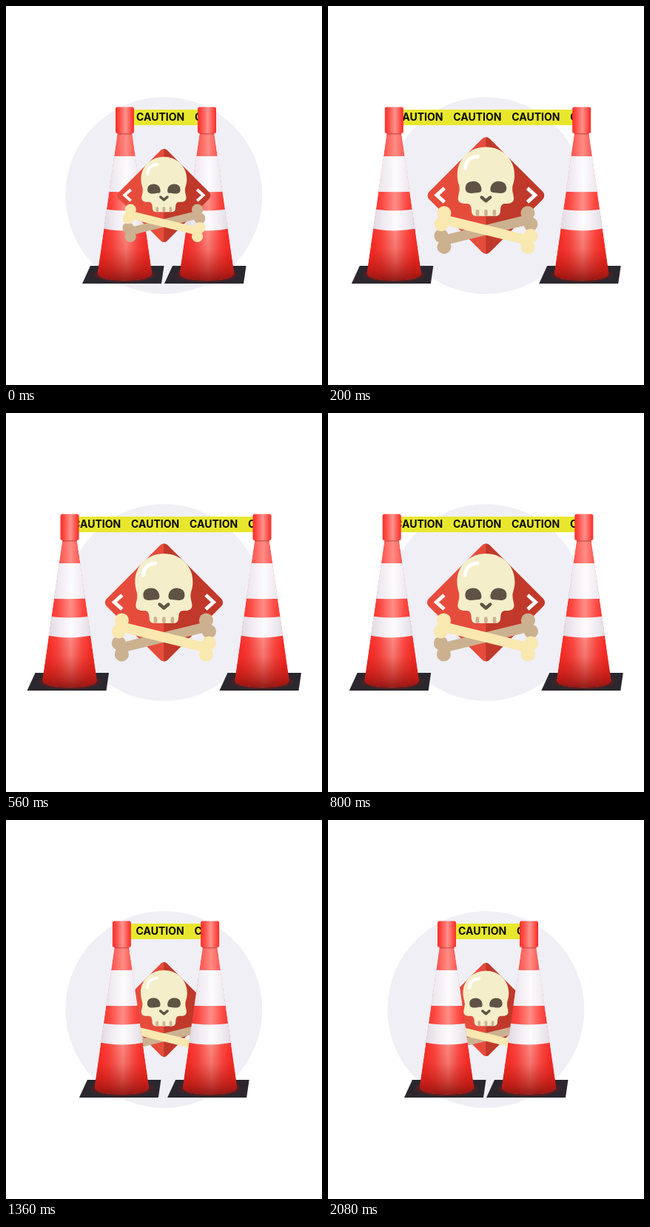
Animation, 427 px wide and 512 px high, one loop 2.12 s. Source, as an HTML page with a canvas:

```html
<!DOCTYPE html>
<html lang="en">
<head>
<meta charset="utf-8">
<title>Caution</title>
<style>
html, body { margin: 0; width: 100%; height: 100%; overflow: hidden; background: #fff; }
canvas { display: block; }
</style>
</head>
<body>
<canvas id="stage" width="427" height="512"></canvas>
<script>
const ctx = document.getElementById('stage').getContext('2d');
const LOOP = 2120, STEP = 40, CLOSE_AT = 1157;
const TRAVEL = 74.3;
const LEFT = 160.5, RIGHT = 271.5;

// Underdamped spring from 0 to 1, t in ms
function spring(t) {
  const s = Math.max(0, t) / 1000, w = 26.2 * s;
  return 1 - Math.exp(-8.43 * s) * (Math.cos(w) + 0.3216 * Math.sin(w));
}

function ramp(gradient, ...stops) {
  stops.forEach(([at, color]) => gradient.addColorStop(at, color));
  return gradient;
}

function fill(path, color) {
  ctx.fillStyle = color;
  ctx.fill(path);
}

function stroke(path, color, width, cap = 'round') {
  ctx.strokeStyle = color;
  ctx.lineWidth = width;
  ctx.lineCap = cap;
  ctx.lineJoin = cap === 'round' ? 'round' : 'miter';
  ctx.stroke(new Path2D(path));
}

function circle(x, y, r, color) {
  const p = new Path2D();
  p.arc(x, y, r, 0, Math.PI * 2);
  fill(p, color);
}

function mirrored(draw) {
  for (const side of [1, -1]) {
    ctx.save();
    ctx.scale(side, 1);
    draw();
    ctx.restore();
  }
}

const baseShape = new Path2D('M-46.5 351H53L49.5 375H-57.5Z');
const coneShape = new Path2D('M-9.6 170H9.6L36.8 361Q36 370.5 0 370.5Q-36 370.5-36.8 361Z');
const bands = [
  new Path2D('M-40 202Q0 204 40 202V249.5Q0 253 -40 249.5Z'),
  new Path2D('M-40 272Q0 281 40 272V298Q0 309 -40 298Z')
];
const capShape = new Path2D();
capShape.roundRect(-12.5, 136.5, 25, 35.5, 2.5);

const redAcross = ramp(ctx.createLinearGradient(-12.5, 0, 12.5, 0),
  [0, '#fb2f29'], [0.18, '#ff4741'], [0.55, '#ff928d'], [0.82, '#ff514b'], [1, '#f92d27']);
const whiteAcross = ramp(ctx.createLinearGradient(-27, 0, 27, 0),
  [0, '#e2dbe3'], [0.25, '#f1ebf2'], [0.55, '#fdfbfd'], [0.8, '#f1ecf2'], [1, '#e4dde5']);
const bodyRed = ramp(ctx.createLinearGradient(-28, 0, 28, 0),
  [0, '#fb312b'], [0.2, '#fc4640'], [0.53, '#ff8d86'], [0.8, '#fd4b45'], [1, '#fa302a']);
const bodyShade = ramp(ctx.createLinearGradient(0, 300, 0, 370),
  [0, 'rgba(190,20,14,0)'], [0.4, 'rgba(200,25,18,.2)'], [0.8, 'rgba(170,20,14,.68)'], [1, 'rgba(140,18,14,.9)']);
const glow = ramp(ctx.createRadialGradient(0, 0, 28, 0, 0, 48),
  [0, 'rgba(150,24,20,.9)'], [0.45, 'rgba(110,28,28,.6)'], [1, 'rgba(43,39,46,0)']);

function cone(x) {
  ctx.save();
  ctx.translate(x, 0);
  fill(baseShape, '#2b272e');

  ctx.save();
  ctx.clip(baseShape);
  ctx.translate(0, 363);
  ctx.scale(1, 0.25);
  ctx.fillStyle = glow;
  ctx.fillRect(-60, -60, 120, 120);
  ctx.restore();

  ctx.save();
  ctx.clip(coneShape);
  fill(coneShape, bodyRed);
  fill(coneShape, bodyShade);
  bands.forEach(b => fill(b, whiteAcross));
  ctx.fillStyle = 'rgba(170,30,26,.45)';
  ctx.fillRect(-12, 171, 24, 2.5);
  ctx.restore();

  fill(capShape, redAcross);
  ctx.restore();
}

function tape(p) {
  const from = LEFT - TRAVEL * p, to = RIGHT + TRAVEL * p;
  ctx.save();
  ctx.beginPath();
  ctx.rect(from, 140, to - from, 21);
  ctx.clip();
  ctx.fillStyle = '#e8e72e';
  ctx.fillRect(from, 140, to - from, 21);
  ctx.fillStyle = '#0b0b0b';
  ctx.font = '700 14px Inter, sans-serif';
  for (let i = -2; i < 4; i++) ctx.fillText('CAUTION', 176 - 7 * p + i * 79, 155.3);
  ctx.restore();
}

const diamond = new Path2D();
{
  const a = 82.4, r = 7;
  diamond.moveTo(a / 2, -a / 2);
  diamond.arcTo(a, 0, 0, a, r);
  diamond.arcTo(0, a, -a, 0, r);
  diamond.arcTo(-a, 0, 0, -a, r);
  diamond.arcTo(0, -a, a, 0, r);
  diamond.closePath();
}
const halfSkull = new Path2D('M-.5 -66H0C22 -66 39 -50 39 -28C39 -18 36 -15 36 -9C36 -4 38 0 38 4' +
  'C38 9 34 11 29 11H26Q21 11 20 17L19.5 23Q18.5 28 13 28H-.5Z');
const eye = new Path2D('M6 -8C6 -15 11 -19.5 17 -19.5C24 -19.5 28 -16 28 -10C28 -5 25 -3 20 -3' +
  'C16 -3 14 -4 10 -4C7 -4 6 -6 6 -8Z');

// Runs from upper left to lower right
function bone(color) {
  stroke('M-57 33L57 61', color, 13.5, 'butt');
  for (const [x, y] of [[57, 24], [61, 39]]) {
    circle(-x, y, 9.6, color);
    circle(x, 94 - y, 9.6, color);
  }
}

function sign(p) {
  const s = (126 + 33 * p) / 159;
  ctx.save();
  ctx.translate(213.4, 256);
  ctx.scale(s, s);

  fill(diamond, '#e64c3c');
  ctx.save();
  ctx.beginPath();
  ctx.rect(0, -90, 90, 180);
  ctx.clip();
  fill(diamond, '#c0392b');
  ctx.restore();

  mirrored(() => stroke('M56.5 -10L67 -.5L56.5 9', '#fff', 5, 'butt'));
  mirrored(() => fill(halfSkull, '#f4efca'));
  mirrored(() => fill(eye, '#5e5344'));
  stroke('M-5.8 2.5L0 7.5L5.8 2.5', '#5e5344', 4.4);
  stroke('M-28 -37C-27.5 -47 -21 -52.5 -11.5 -53', '#fff', 5);
  for (const x of [-11.5, 0, 11.5]) stroke(`M${x} 21.5V26`, '#cbb291', 4.6);

  ctx.save();
  ctx.scale(-1, 1);
  bone('#ccb190');
  ctx.restore();
  bone('#f9e8b0');
  ctx.restore();
}

function cones(p) {
  cone(LEFT - TRAVEL * p);
  cone(RIGHT + TRAVEL * p);
}

function draw(t) {
  const closing = t >= CLOSE_AT;
  const p = closing ? 1 - spring(t - CLOSE_AT) : spring(t);
  ctx.fillStyle = '#fff';
  ctx.fillRect(0, 0, 427, 512);
  circle(213.3, 256, 133, '#f0eff6');
  tape(p);
  // The sign passes behind the cones on the way back
  if (closing) { sign(p); cones(p); }
  else { cones(p); sign(p); }
}

const start = performance.now();
function tick() {
  const t = (performance.now() - start) % LOOP;
  draw(Math.floor(t / STEP) * STEP);
  requestAnimationFrame(tick);
}
tick();
</script>
</body>
</html>
```
